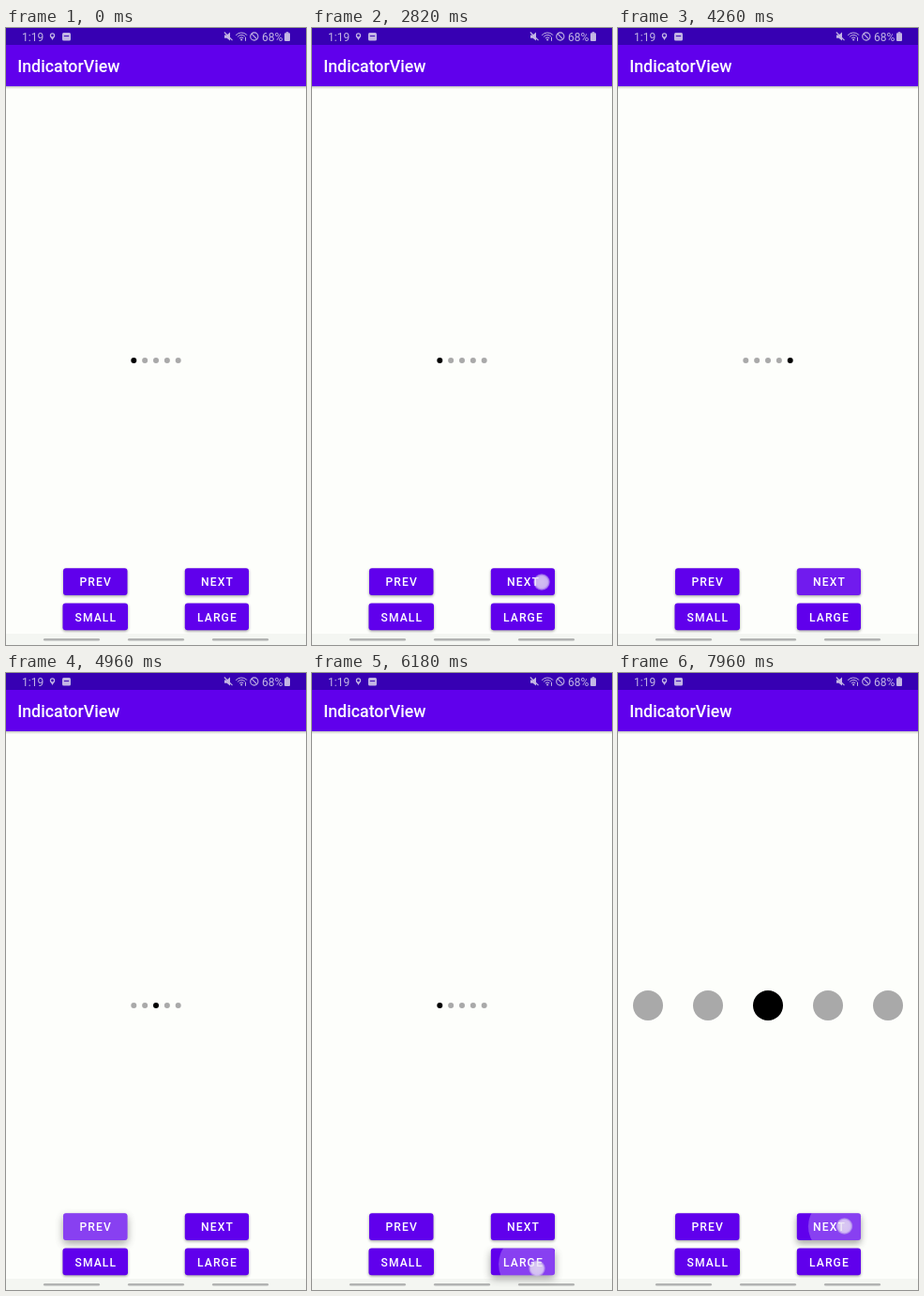
Animation, 320 px wide and 657 px high, one loop 7.99 s. Source, as an HTML page with a canvas:

```html
<!DOCTYPE html>
<html lang="en">
<head>
<meta charset="utf-8">
<title>IndicatorView</title>
<style>
html, body { margin: 0; width: 100%; height: 100%; overflow: hidden; background: #fdfefb; }
canvas { display: block; width: 320px; height: 657px; }
</style>
</head>
<body>
<canvas id="stage"></canvas>
<script>
const W = 320, H = 657, LOOP = 7990;
const HOLD = 115, ENTER = 225, EXIT = 150;
const PAPER = '#fdfefb', PURPLE = '#6000ec', BAR = '#3700b3', ICON = '#c3b6e4';

const canvas = document.getElementById('stage');
const ctx = canvas.getContext('2d');
const dpr = window.devicePixelRatio || 1;
canvas.width = W * dpr;
canvas.height = H * dpr;

const buttons = {
  prev: { label: 'PREV', x: 61, y: 575.3, w: 68.5, tx: 78.5 },
  next: { label: 'NEXT', x: 190.8, y: 575.3, w: 68.2, tx: 208 },
  small: { label: 'SMALL', x: 60.5, y: 612.6, w: 69.5, tx: 73.5 },
  large: { label: 'LARGE', x: 190.8, y: 612.6, w: 68.2, tx: 204 }
};
const BH = 28.6;

const tap = (at, key, x, y) => ({ at, key, x, y });
const taps = [
  tap(2820, 'next', 245, 590), tap(3230, 'next', 244, 590),
  tap(3575, 'next', 242.5, 589), tap(3950, 'next', 243, 589),
  tap(4470, 'prev', 83, 588), tap(4770, 'prev', 82, 587),
  tap(5060, 'prev', 82, 586), tap(5350, 'prev', 82, 586),
  tap(6090, 'large', 240, 634), tap(6450, 'large', 240, 634),
  tap(7200, 'next', 243, 590), tap(7530, 'next', 242, 589),
  tap(7880, 'next', 241.5, 589)
];

const clamp = v => Math.max(0, Math.min(1, v));
const mix = (a, b, p) => a + (b - a) * p;

// cubic-bezier(.4, 0, .2, 1)
function ease(x) {
  x = clamp(x);
  let lo = 0, hi = 1, s = x;
  for (let i = 0; i < 18; i++) {
    s = (lo + hi) / 2;
    const bx = 1.2 * s * (1 - s) ** 2 + 0.6 * s * s * (1 - s) + s ** 3;
    if (bx < x) lo = s; else hi = s;
  }
  return 3 * s * s * (1 - s) + s ** 3;
}

function disc(x, y, r, fill) {
  ctx.fillStyle = fill;
  ctx.beginPath();
  ctx.arc(x, y, r, 0, Math.PI * 2);
  ctx.fill();
}

function box(x, y, w, h, r, fill) {
  ctx.fillStyle = fill;
  ctx.beginPath();
  ctx.roundRect(x, y, w, h, r);
  ctx.fill();
}

function poly(points, fill) {
  ctx.fillStyle = fill;
  ctx.beginPath();
  points.forEach(([x, y]) => ctx.lineTo(x, y));
  ctx.closePath();
  ctx.fill();
}

function line(x1, y1, x2, y2, color, width) {
  ctx.strokeStyle = color;
  ctx.lineWidth = width;
  ctx.beginPath();
  ctx.moveTo(x1, y1);
  ctx.lineTo(x2, y2);
  ctx.stroke();
}

function label(text, x, y, size, weight, color, spacing = 0) {
  ctx.font = `${weight} ${size}px Roboto, sans-serif`;
  ctx.letterSpacing = spacing + 'px';
  ctx.fillStyle = color;
  ctx.fillText(text, x, y);
}

function statusBar() {
  ctx.fillStyle = BAR;
  ctx.fillRect(0, 0, W, 18);
  label('1:19', 17, 13.8, 12, 400, ICON);
  label('68%', 273, 13.8, 12, 400, ICON);

  // location pin
  disc(49.5, 8, 2.7, ICON);
  poly([[47.5, 9.5], [51.5, 9.5], [49.5, 13]], ICON);
  disc(49.5, 8, 1.4, BAR);

  // badge
  box(60, 5, 9, 8.5, 1.5, ICON);
  line(61.8, 8.6, 67.2, 8.6, BAR, 1);

  // muted speaker
  poly([[233, 7.5], [235.5, 7.5], [239, 4.5], [239, 13.5], [235.5, 10.7], [233, 10.7]], ICON);
  line(232.8, 4.5, 241.5, 13.2, ICON, 1.1);

  // wifi
  ctx.strokeStyle = ICON;
  ctx.lineWidth = 1;
  [3, 5.5, 8].forEach(r => {
    ctx.beginPath();
    ctx.arc(251.2, 13, r, -Math.PI * 0.77, -Math.PI * 0.23);
    ctx.stroke();
  });
  disc(251.2, 12.5, 1.1, ICON);
  line(255.5, 10, 255.5, 13.8, ICON, 1);

  // blocked
  ctx.lineWidth = 1.1;
  ctx.beginPath();
  ctx.arc(264.8, 9, 4.1, 0, Math.PI * 2);
  ctx.stroke();
  line(262, 6.2, 267.6, 11.8, ICON, 1.1);

  // battery
  box(297, 5.3, 6, 8.7, 1, ICON);
  ctx.fillRect(298.7, 4.2, 2.6, 1.5);
}

function appBar() {
  const shade = ctx.createLinearGradient(0, 62, 0, 65);
  shade.addColorStop(0, 'rgba(60,60,60,.3)');
  shade.addColorStop(1, 'rgba(60,60,60,0)');
  ctx.fillStyle = shade;
  ctx.fillRect(0, 62, W, 3);
  ctx.fillStyle = PURPLE;
  ctx.fillRect(0, 18, W, 44);
  label('IndicatorView', 12.2, 47, 17.8, 500, '#fff');
}

function navBar() {
  ctx.fillStyle = '#f4f6f2';
  ctx.fillRect(0, 645, W, 12);
  [40, 130, 220].forEach(x => box(x, 650, 60, 2.4, 1.2, '#b2b3b2'));
}

function dots(t) {
  let index = 0, big = false;
  for (const p of taps) {
    if (t < p.at + HOLD + 10) break;
    if (p.key === 'next') index++;
    else if (p.key === 'prev') index--;
    else big = true;
  }
  const pitch = big ? 64 : 11.85, r = big ? 16 : 3;
  for (let i = 0; i < 5; i++) {
    disc(160 + (i - 2) * pitch, 354, r, i === index ? '#000' : '#a9a9a9');
  }
}

function ripple(b, p, age) {
  const k = ease(age / ENTER);
  const fade = 1 - clamp((age - ENTER) / EXIT);
  const x = mix(p.x, b.x + b.w / 2, k);
  const y = mix(p.y, b.y + BH / 2, k);
  disc(x, y, mix(21, 38, k), `rgba(255,255,255,${0.25 * clamp(age / 75) * fade})`);
}

function button(key, t) {
  const b = buttons[key];
  const active = taps.filter(p => p.key === key && t >= p.at && t < p.at + ENTER + EXIT);
  let lift = 0;
  active.forEach(p => {
    const age = t - p.at;
    lift = Math.max(lift, clamp(age / 100) * (1 - clamp((age - HOLD - 64) / 100)));
  });

  ctx.save();
  ctx.shadowColor = 'rgba(50,50,50,.45)';
  ctx.shadowBlur = mix(3, 9, lift) * dpr;
  ctx.shadowOffsetY = mix(1.3, 4, lift) * dpr;
  box(b.x, b.y, b.w, BH, 3, PURPLE);
  ctx.restore();

  ctx.save();
  ctx.beginPath();
  ctx.roundRect(b.x, b.y, b.w, BH, 3);
  ctx.clip();
  active.forEach(p => ripple(b, p, t - p.at));
  ctx.restore();
  label(b.label, b.tx, b.y + 19, 12.1, 500, '#fff', 1.1);
}

function pointer(t) {
  const p = taps.find(p => t >= p.at && t < p.at + HOLD);
  if (!p) return;
  const glow = ctx.createRadialGradient(p.x, p.y, 0, p.x, p.y, 9);
  glow.addColorStop(0, 'rgba(235,230,242,.82)');
  glow.addColorStop(0.6, 'rgba(232,226,242,.8)');
  glow.addColorStop(0.75, 'rgba(240,236,248,.7)');
  glow.addColorStop(0.9, 'rgba(205,190,235,.55)');
  glow.addColorStop(1, 'rgba(190,170,230,.2)');
  disc(p.x, p.y, 9, glow);
}

function draw(now) {
  const t = now % LOOP;
  ctx.setTransform(dpr, 0, 0, dpr, 0, 0);
  ctx.fillStyle = PAPER;
  ctx.fillRect(0, 0, W, H);
  statusBar();
  appBar();
  navBar();
  dots(t);
  Object.keys(buttons).forEach(key => button(key, t));
  pointer(t);
}

const start = performance.now();
function frame() {
  draw(performance.now() - start);
  requestAnimationFrame(frame);
}
frame();
</script>
</body>
</html>
```
